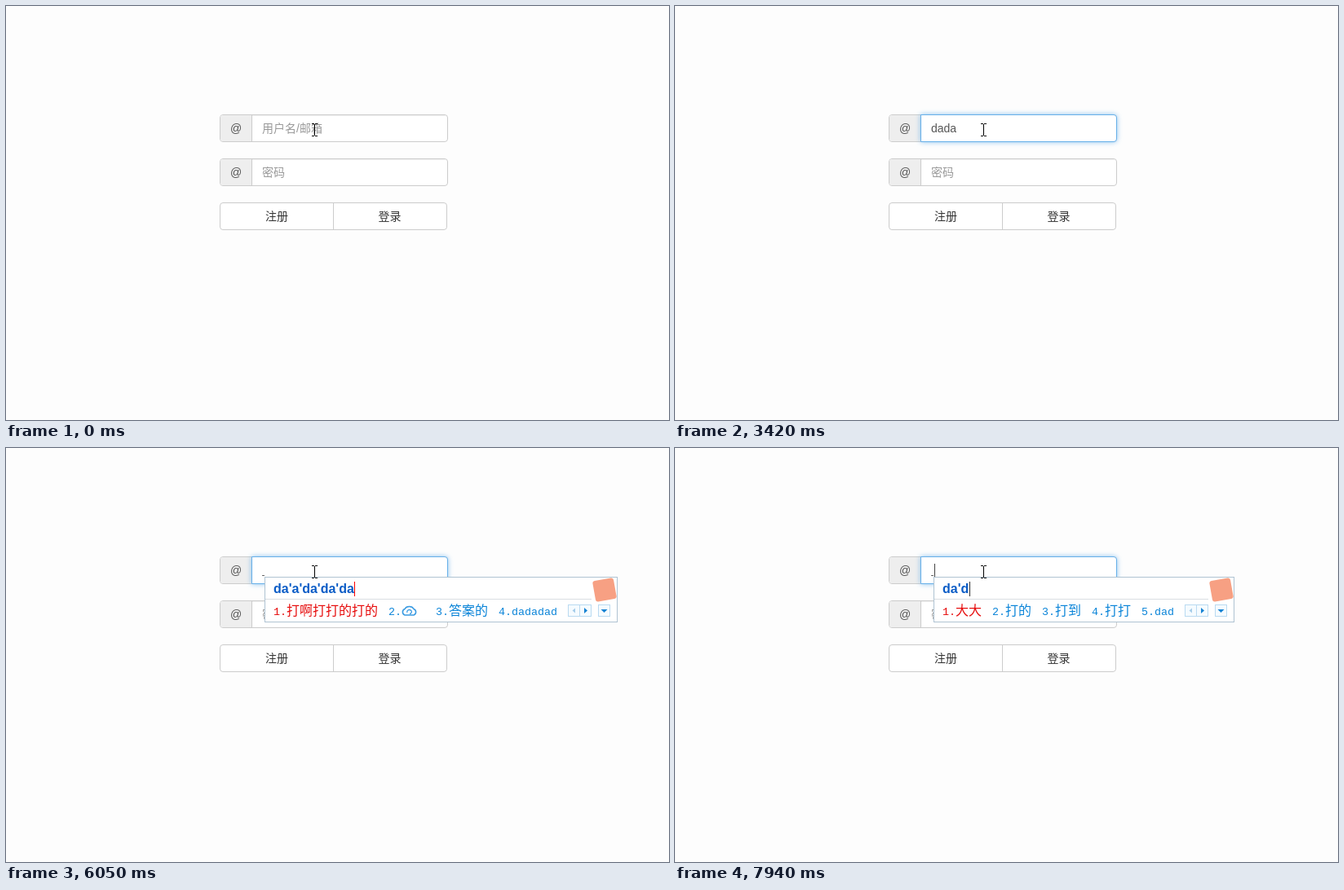
Recreate the animation shown at these times as an HTML page. Size 813 by 508 pixels, loop 8 s.

```html
<!DOCTYPE html>
<html lang="zh-CN">
<head>
<meta charset="utf-8">
<style>
html, body { margin: 0; width: 100%; height: 100%; overflow: hidden; background: #fdfdfd; }
svg { display: block; }
text { font: 14px "Liberation Sans", "Noto Sans CJK SC", "Noto Sans CJK", sans-serif; fill: #555; }
.hint { fill: #999; }
.button { fill: #333; }
.item { font: bold 12px "Open Sans", "Noto Sans CJK SC", "Noto Sans CJK", sans-serif; fill: #000; }
.pinyin { font: bold 16px "Liberation Sans", sans-serif; fill: #0b5cc6; }
.word { font: 16px "Noto Sans CJK SC", "Noto Sans CJK", sans-serif; }
.word tspan { font: 13.33px "Liberation Mono", monospace; }
.focus { filter: drop-shadow(0 0 3px rgba(102, 175, 233, .75)); }
</style>
</head>
<body>
<svg id="stage" width="813" height="508"></svg>
<script>
const LOOP = 8000;
const stage = document.getElementById('stage');
const pen = document.createElement('canvas').getContext('2d');
const width = (s, font) => { pen.font = font; return pen.measureText(s).width; };

const rect = (x, y, w, h, fill, more = '') =>
  `<rect x="${x}" y="${y}" width="${w}" height="${h}" fill="${fill}" ${more}/>`;
const path = (d, fill, more = '') => `<path d="${d}" fill="${fill}" ${more}/>`;
const text = (x, y, s, cls = '', more = '') =>
  `<text x="${x}" y="${y}" class="${cls}" ${more}>${s}</text>`;
const edge = color => `stroke="${color}"`;

const CLOUD = '*';
const names = ['sorlen', '陈木禾', '齐岚', 'qilan', 'xifan', '奚帆'];
const rows = {
  one: ['的', '大', '到', '都', '对'],
  three: ['打啊打', CLOUD, '大爱的', '答案的', '大啊'],
  many: ['打啊打打的打的', CLOUD, '答案的', 'dadadad'],
  two: ['大啊', '打啊', '凳矮矮', '答案', 'DAA'],
  long: ['大啊大啊的的', CLOUD, '大啊'],
  last: ['大大', '打的', '打到', '打打', 'dad']
};

// time, field content ('' shows the hint, '_' is composing), caret, pinyin, candidate row
const steps = [
  [0, '', 0], [150, '', 1], [270, '', 1], [730, '', 0], [1290, '', 1], [1720, '', 0], [2280, '', 1],
  [2590, 'da', 1], [2870, 'dada', 1], [3420, 'dada', 0], [3820, 'dad', 1],
  [4130, 'da', 1], [4250, 'd', 1], [4370, '', 1], [4990, '', 0], [5300, '_', 1],
  [5420, '_', 1, "d", 'one'],
  [5570, '_', 1, "da'a'd", 'three'],
  [5690, '_', 1, "da'a'da", 'three'],
  [5810, '_', 1, "da'a'da'd", 'many'],
  [5930, '_', 0, "da'a'da'da", 'many'],
  [6050, '_', 0, "da'a'da'da'da", 'many'],
  [6170, '_', 0, "da'a'da'da'da'a", 'many'],
  [6320, '_', 0, "da'a'da'da'da'a'd", 'many'],
  [6470, '_', 1, "da'a", 'two'],
  [6970, '_', 0, "da'a'da'a'd'd'da'a'd'a'a", 'long'],
  [7120, '_', 1, "da'a'da'a'd'd'da'a'd'a'a", 'long'],
  [7520, '_', 0, "da'a'da'a'd'd", 'long'],
  [7670, '_', 0, "da'a'da'a'd", 'long'],
  [7790, '_', 0, "da'a'da'a'da", 'long'],
  [7940, '_', 1, "da'd", 'last']
];

function group(y) {
  return rect(262.5, y + .5, 279, 33, '#fff', `rx="3.5" ${edge('#ccc')}`) +
    path(`M301 ${y + 1}H266a3 3 0 0 0-3 3v26a3 3 0 0 0 3 3h35z`, '#eee') +
    rect(301, y, 1, 34, '#ccc') +
    rect(302, y + 1, 237, 1, '#f0f0f0') +
    text(275, y + 22, '@');
}

function form() {
  return group(133) + group(187) + text(314, 209, '密码', 'hint') +
    rect(262.5, 241.5, 278, 33, '#fff', `rx="3.5" ${edge('#ccc')}`) +
    rect(401, 241, 1, 34, '#ccc') +
    text(318, 263, '注册', 'button') + text(456.5, 263, '登录', 'button');
}

function field(value, caret, focus) {
  let out = '';
  if (focus) {
    out += path('M301.5 133.5H538a3.5 3.5 0 0 1 3.5 3.5v26a3.5 3.5 0 0 1-3.5 3.5H301.5z', '#fff',
      `class="focus" opacity="${focus}" ${edge('#66afe9')}`);
  }
  const composing = value === '_';
  if (composing) out += rect(314, 156, 3, 1, '#666');
  else out += value ? text(314, 155, value) : text(314, 155, '用户名/邮箱', 'hint');
  const x = composing ? 318 : 314 + Math.ceil(width(value, '14px "Liberation Sans", sans-serif'));
  return caret ? out + rect(x, 142, 1, 16, '#444') : out;
}

function list() {
  return rect(300.5, 167.5, 241, 145, '#fff', edge('#c4c4c4')) +
    rect(301, 166, 240, 1, '#66afe9') +
    names.map((name, i) => text(309, 184 + 24 * i, name, 'item')).join('');
}

function cloud(x) {
  return path(`M${x + 4} 205a4 4 0 0 1 0-7.500a6 5 0 0 1 11 0a4 4 0 0 1 0 7.500z`, 'none',
      `${edge('#3a9be2')} stroke-width="1.600"`) +
    path(`M${x + 7} 202a2.800 2.500 0 1 1 3 1.500`, 'none', `${edge('#3a9be2')} stroke-width="1.300"`);
}

function pager(x) {
  const box = (dx, w) => rect(x + dx + .5, 192.5, w, 14, '#f5fbff', edge('#b9daf1'));
  return box(0, 14) + box(14, 14) + box(37, 14) +
    path(`M${x + 9} 196.500v6l-3.500-3z`, '#a5cdea') +
    path(`M${x + 20} 196v7l4-3.500z`, '#1683d3') +
    path(`M${x + 40.5} 198h8l-4 4z`, '#1683d3');
}

function popup(pinyin, key) {
  let x = 328, words = '';
  rows[key].forEach((word, i) => {
    const color = i ? '#0a84d8' : '#e60c0c';
    const label = `${i + 1}.${word === CLOUD ? '' : word}`;
    words += text(x, 205, label.replace(/[\x20-\x7e]+/g, '<tspan>$&</tspan>'), 'word', `style="fill:${color}"`);
    if (word === CLOUD) words += cloud(x + 16);
    const size = word === CLOUD ? 45 : [...label].reduce((sum, c) => sum + (c < '\x7f' ? 8 : 16), 0);
    x += size + 13;
  });
  const right = x + 61;
  const caret = Math.floor(329 + width(pinyin, 'bold 16px "Liberation Sans", sans-serif'));
  return rect(317.5, 158.5, right - 318, 55, '#fff', edge('#afc3d2')) +
    rect(318, 185, right - 350, 1, '#d9dee2') +
    text(328, 178, pinyin, 'pinyin') +
    rect(caret, 164, 1, 18, key === 'last' ? '#333' : '#f00') +
    words + pager(x) +
    rect(right - 29, 161, 26, 26, '#f7a083', `rx="3" transform="rotate(-10 ${right - 16} 174)"`);
}

const pointer = path('M375 144.500h3m1 0h3M375 159.500h3m1 0h3M378.500 145v14', 'none', edge('#000'));

function draw([time, value, caret, pinyin, key]) {
  const focus = time < 150 ? 0 : time < 270 ? .6 : 1;
  stage.innerHTML = form() + field(value, caret, focus) +
    (time >= 150 && time < 2590 ? list() : '') +
    (pinyin ? popup(pinyin, key) : '') + pointer;
}

let shown;
function tick() {
  const t = performance.now() % LOOP;
  const step = steps.findLast(s => s[0] <= t);
  if (step !== shown) draw(shown = step);
  requestAnimationFrame(tick);
}
tick();
</script>
</body>
</html>
```
